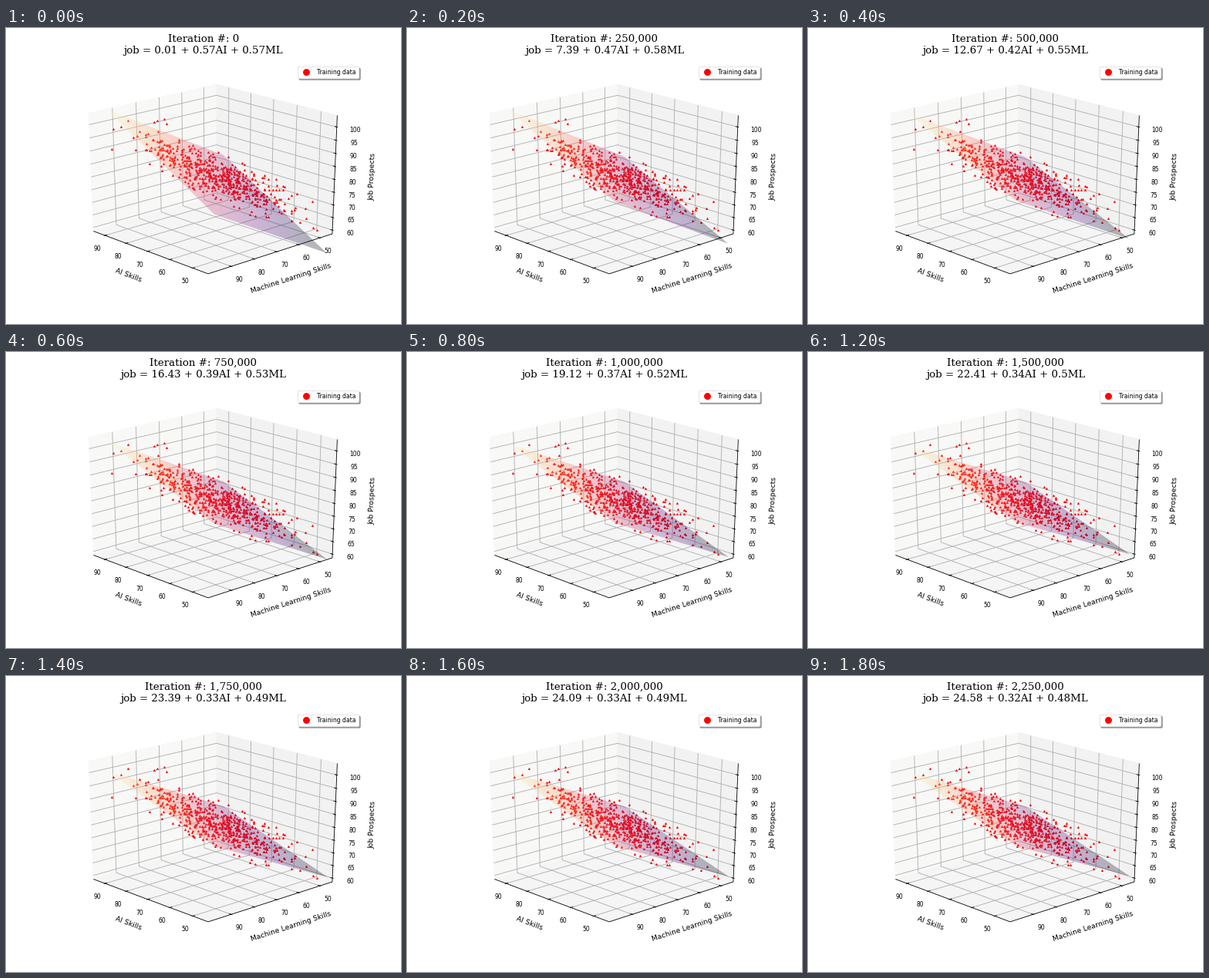
Recreate the animation shown at these times as a matplotlib script. Size 512 by 384 pixels, loop 2 s.

```python
import numpy as np
import matplotlib.pyplot as plt
from matplotlib.animation import FuncAnimation
from matplotlib.collections import PolyCollection
from matplotlib.lines import Line2D

W, H, DPI = 512, 384, 80
ELEV, AZIM, DIST = np.radians(23), np.radians(137), 10
CENTER = np.array([267.8, 190.2])
SCALE = np.array([2145, 1598])

# Pane limits of AI, ML and job prospects
LO = np.array([43.4, 44.1, 58.5])
HI = np.array([95.6, 99.8, 104.3])
SKILL_TICKS = range(50, 91, 10)
JOB_TICKS = range(60, 101, 5)
SMALL, MEDIUM = 6.85, 8.33

CE, SE, CA, SA = np.cos(ELEV), np.sin(ELEV), np.cos(AZIM), np.sin(AZIM)
VIEW = np.array([CA * CE, SA * CE, SE])
RIGHT = np.array([-SA, CA, 0])
UP = np.array([-CA * SE, -SA * SE, CE])


def project(points):
    """Perspective view of data points, in stage pixels (y down)."""
    v = ((np.asarray(points, float) - LO) / (HI - LO) - 0.5) * 25 / 24
    depth = DIST - v @ VIEW
    flat = np.stack([v @ RIGHT, -(v @ UP)], axis=-1)
    return CENTER + SCALE * flat / depth[..., None]


fig = plt.figure(figsize=(W / DPI, H / DPI), dpi=DPI, facecolor="white")
ax = fig.add_axes([0.125, 0.11, 0.775, 0.77])
ax.set_xlim(64, 460.8)
ax.set_ylim(341.76, 46.08)
ax.axis("off")

(x0, y0, z0), (x1, y1, z1) = LO, HI


def path(points, color, width, zorder):
    ax.plot(*project(points).T, color=color, lw=width, zorder=zorder,
            solid_capstyle="butt")


def pane(points, shade):
    ax.add_patch(plt.Polygon(project(points), fc=shade, ec=shade, lw=0.8, zorder=1))


def label(x, y, text, size, angle=0):
    ax.text(x, y, text, fontsize=size, rotation=angle, ha="center",
            va="center", rotation_mode="anchor")


def tick(at, axis, text, dx, dy):
    """Short stroke across the axis line plus its number."""
    step = np.zeros(3)
    step[axis] = (HI - LO)[axis] / 12
    out = 1 if axis == 1 else -1
    at = np.array(at, float)
    path([at + 0.1 * out * step, at - 0.2 * out * step], "black", 0.8, 4)
    x, y = project(at)
    label(x + dx, y + dy, text, SMALL)


# Box
pane([(x1, y1, z0), (x1, y0, z0), (x1, y0, z1), (x1, y1, z1)], "#f8f8f7")
pane([(x1, y0, z0), (x0, y0, z0), (x0, y0, z1), (x1, y0, z1)], "#f2f2f2")
pane([(x0, y0, z0), (x1, y0, z0), (x1, y1, z0), (x0, y1, z0)], "#f5f5f5")

GRID = "#b0b0b0"
for t in SKILL_TICKS:
    path([(t, y1, z0), (t, y0, z0), (t, y0, z1)], GRID, 0.8, 2)
    path([(x0, t, z0), (x1, t, z0), (x1, t, z1)], GRID, 0.8, 2)
    tick((t, y1, z0), 1, str(t), -10, 17.5)
    tick((x0, t, z0), 0, str(t), 10, 17.5)
for t in JOB_TICKS:
    path([(x1, y1, t), (x1, y0, t), (x0, y0, t)], GRID, 0.8, 2)
    tick((x0, y0, t), 0, str(t), 23.5, 4)

path([(x1, y1, z0), (x0, y1, z0), (x0, y0, z0), (x0, y0, z1)], "black", 0.75, 4)

label(159, 321, "AI Skills", MEDIUM, -20.4)
label(370, 325, "Machine Learning Skills", MEDIUM, 17.9)
label(475, 193, "Job Prospects", MEDIUM, 87.8)

# Training data: a slanted cloud with a few stragglers
rng = np.random.default_rng(11)
px = rng.normal(273, 48, 580)
spread = np.clip(rng.normal(0, 12.5, 580), -31, 31)
py = 182 + 0.43 * (px - 252) + spread * np.exp(-((px - 270) / 170) ** 2)
keep = (px > 162) & (px < 382)
stragglers = np.array([
    (137, 157), (139, 131), (149, 128), (158, 120), (165, 142), (192, 122),
    (196, 120), (205, 118), (208, 124), (186, 176), (340, 196), (350, 196),
    (361, 206), (397, 225), (388, 234), (389, 247), (398, 259), (403, 262),
    (370, 250), (381, 252), (316, 242), (323, 244), (340, 245), (216, 191)])
px = np.r_[px[keep], stragglers[:, 0]]
py = np.r_[py[keep], stragglers[:, 1]]
ax.plot(px, py, "^", color="red", ms=2, mew=0.6, zorder=5)

dot = Line2D([], [], color="red", marker="o", ms=7, ls="none")
ax.legend([dot], ["Training data"], loc="upper right", fontsize=SMALL,
          shadow=True, numpoints=1, handlelength=2.2, edgecolor="0.9")

# Fitted plane
N = 40
ai, ml = np.meshgrid(np.linspace(44.5, 91.3, N + 1), np.linspace(45.2, 96.1, N + 1))
surface = PolyCollection([], cmap="magma", alpha=0.3, linewidths=0,
                         antialiaseds=True, zorder=6)
ax.add_collection(surface, autolim=False)

title = fig.text(0.5, 0.98, "", family="DejaVu Serif", fontsize=12,
                 ha="center", va="top")

BIAS = [0.01, 7.39, 12.67, 16.43, 19.12, 21.04, 22.41, 23.39, 24.09, 24.58]


def weights(k):
    """Slopes settle geometrically after the first leap."""
    if k == 0:
        return 0.5651, 0.5651
    decay = 0.715 ** (k - 1)
    return 0.31 + 0.16 * decay, 0.478 + 0.1016 * decay


def update(k):
    b, (wa, wm) = BIAS[k], weights(k)
    job = b + wa * ai + wm * ml
    p = project(np.stack([ai, ml, job], axis=-1))
    quads = np.stack([p[:-1, :-1], p[1:, :-1], p[1:, 1:], p[:-1, 1:]], axis=2)
    surface.set_verts(quads.reshape(-1, 4, 2))
    mean = (job[:-1, :-1] + job[1:, :-1] + job[1:, 1:] + job[:-1, 1:]) / 4
    surface.set_array(mean.ravel())
    surface.set_clim(mean.min(), mean.max())
    title.set_text(f"Iteration #: {k * 250000:,}\n"
                   f"job = {b} + {round(wa, 2)}AI + {round(wm, 2)}ML")
    return surface, title


anim = FuncAnimation(fig, update, frames=10, interval=200, repeat=True,
                     repeat_delay=0, blit=False)
plt.show()
```
